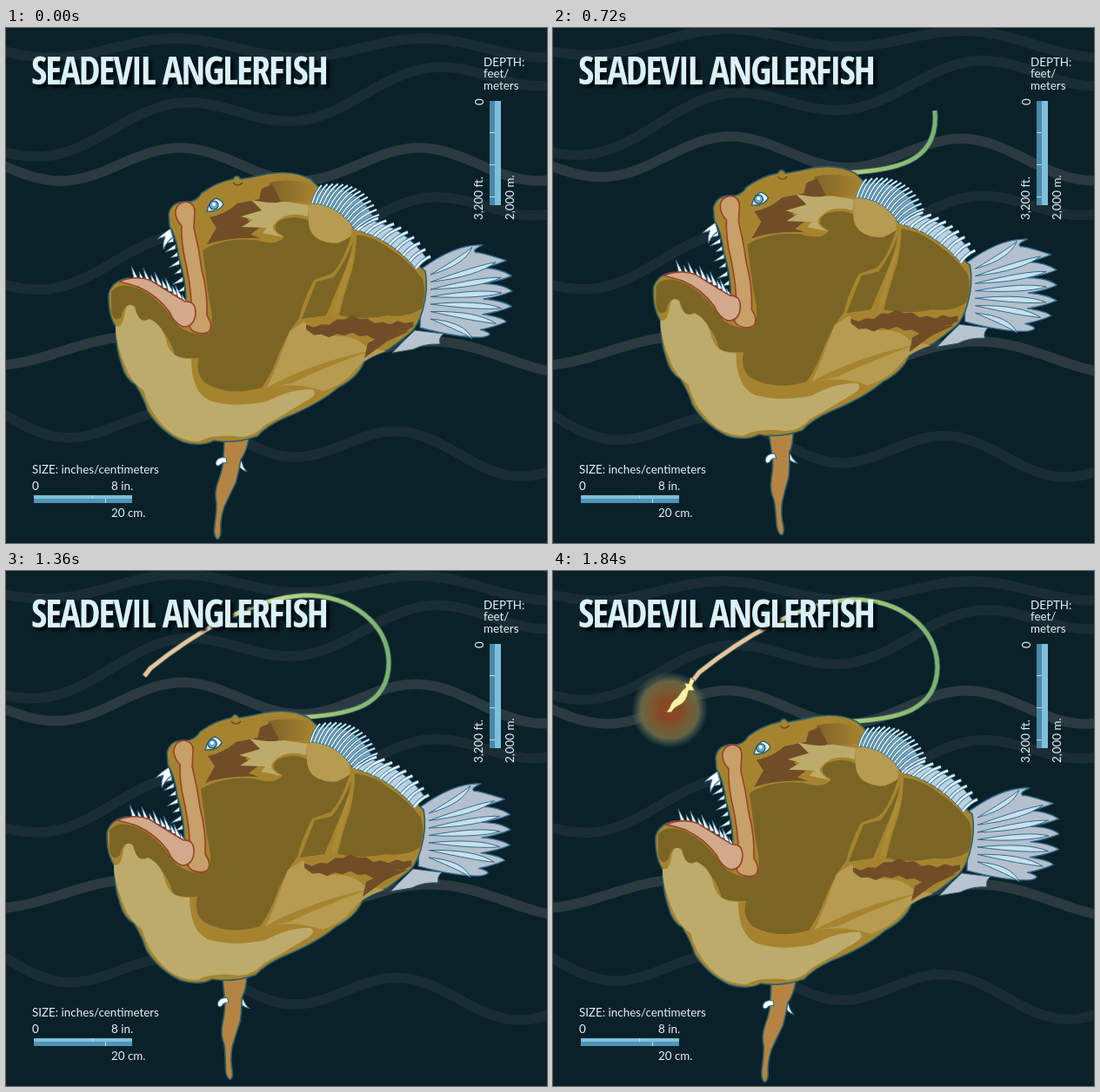
Animation of 622 by 593 pixels, one loop 1.92 s. Source, as an HTML page with a canvas:

```html
<!DOCTYPE html>
<html lang="en">
<head>
<meta charset="utf-8">
<title>Seadevil Anglerfish</title>
<style>
html, body { margin: 0; width: 100%; height: 100%; overflow: hidden; background: #0a2129; }
canvas, svg { position: absolute; left: 0; top: 0; width: 622px; height: 593px; display: block; }
text { font: 13.4px Lato, 'Open Sans', sans-serif; fill: #e4f1f6; }
#title { font-weight: 700; font-stretch: 62.5%; letter-spacing: -.045em; fill: #d9f1fd;
  filter: drop-shadow(4px 4px 1.5px #02080c); }
</style>
</head>
<body>
<canvas id="sea" width="622" height="593"></canvas>
<svg viewBox="0 0 622 593">
  <text id="title" x="29" y="68">SEADEVIL ANGLERFISH</text>
  <text x="549" y="44">DEPTH:</text>
  <text x="549" y="57">feet/</text>
  <text x="549" y="71">meters</text>
  <text transform="translate(549 89) rotate(-90)">0</text>
  <text transform="translate(548 221) rotate(-90)">3,200 ft.</text>
  <text transform="translate(584 221) rotate(-90)">2,000 m.</text>
  <text x="30" y="513">SIZE: inches/centimeters</text>
  <text x="30" y="532">0</text>
  <text x="121" y="532">8 in.</text>
  <text x="121" y="563">20 cm.</text>
</svg>
<script>
const LOOP = 1920, STEP = 80, TAU = 2 * Math.PI;
const ctx = document.getElementById('sea').getContext('2d');
const GOLD = '#a6842f', DARK = '#7b6525', TAN = '#bdab6b', OCHRE = '#b69b50', BROWN = '#704d27';
const EDGE = '#2b606a', BLUE = '#2f6d8f', LIP = '#9c4029', PALE = '#c9e0ed';

const clamp = v => Math.max(0, Math.min(1, v));
const range = n => [...Array(n).keys()];
const quad = ([a, b, c], t) => [0, 1].map(i =>
  (1 - t) * (1 - t) * a[i] + 2 * t * (1 - t) * b[i] + t * t * c[i]);

// Pick the narrowest installed face, then the largest size that fits the line.
function fitTitle() {
  const el = document.getElementById('title');
  const faces = ['Noto Sans ExtraCondensed', 'Open Sans Condensed', 'Roboto Condensed',
    'Noto Sans', 'Open Sans', 'Roboto', 'Liberation Sans'];
  const setFace = f => {
    el.style.fontFamily = `'${f}', sans-serif`;
    return el.getComputedTextLength();
  };
  el.style.fontSize = '52px';
  const best = faces.map(f => [setFace(f), f]).sort((a, b) => a[0] - b[0])[0];
  setFace(best[1]);
  const size = Math.min(52, 52 * 340 / best[0]);
  el.style.fontSize = size + 'px';
  el.setAttribute('y', 49.5 + .357 * size);
}

function shape(d, fill, stroke, width = 1.4) {
  const p = new Path2D(d);
  if (fill) { ctx.fillStyle = fill; ctx.fill(p); }
  if (stroke) { ctx.strokeStyle = stroke; ctx.lineWidth = width; ctx.stroke(p); }
}
const poly = pts => 'M' + pts.join('L');

// Each wave is a tilted cosine with crests at two given x; its middle rises by lift.
const waves = [
  { base: 23, amp: 11, tilt: 0, crests: [195, 480], lift: 15 },
  { base: 134, amp: 20, tilt: -.14, crests: [195, 485], lift: 15 },
  { base: 157, amp: 19, tilt: 0, crests: [200, 475], lift: 18, light: true },
  { base: 288, amp: 20, tilt: -.15, crests: [195, 480], lift: 3 },
  { base: 371, amp: 18, tilt: .016, crests: [150, 490], lift: 0, light: true },
  { base: 446, amp: 20, tilt: .085, crests: [195, 455], lift: -8 }
];

function drawWaves(k) {
  for (const { base, amp, tilt, crests: [a, b], lift, light } of waves) {
    const y = x => base + tilt * x - amp * Math.cos(TAU * (x - a) / (b - a))
      - k * lift * Math.sin(Math.PI * x / 622);
    const pts = range(109).map(i => 6 * i - 12).map(x => [x, y(x)]);
    shape(poly(pts), null, light ? '#2b3a40' : '#1b2d34', 11.5);
  }
}

function drawScales() {
  const bar = (c, x, y, w, h) => { ctx.fillStyle = c; ctx.fillRect(x, y, w, h); };
  bar('#4b88a8', 556, 84, 6, 120);
  bar('#7cc0da', 562, 84, 7, 120);
  for (const y of [120, 157, 194]) bar('#b9dcea', 556, y, 6, 1);
  bar('#7cc0da', 32, 538, 113, 4);
  bar('#4f94b4', 32, 542, 113, 5);
  bar('#b9dcea', 99, 538, 1, 4);
  bar('#b9dcea', 114, 542, 1, 5);
}

function drawFin(base, tip, count, web, width) {
  const rays = range(count).map(i => [base, tip].map(c => quad(c, i / (count - 1))));
  const rim = [...rays.map(r => r[0]), ...rays.map(r => quad([r[0], r[0], r[1]], .88)).reverse()];
  shape(poly(rim) + 'Z', web, BLUE, 1);
  for (const [[x, y], [u, v]] of rays) {
    const d = `M${x} ${y}Q${x + (u - x) * .4} ${y + (v - y) * .7} ${u} ${v}`;
    shape(d, null, BLUE, width + 1.5);
    shape(d, null, '#e6f3f9', width);
  }
}

function drawTail() {
  shape('M444 374Q457 360 470 348L503 352Q497 357 499 364Q482 363 468 370Z', '#b8c4d0', EDGE, 1);
  const tips = range(7).map(i => {
    const u = (i - 3) / 3;
    return { x: 582 - 34 * u ** 4, y: 303 + 53 * u, notch: 549 - 8 * u * u, lean: 5 * u };
  });
  let d = 'M478 277Q518 248 ';
  tips.forEach(({ x, y, notch, lean }, i) => {
    d += `${x} ${y}`;
    if (i < 6) d += `Q${x - 14} ${y + 6} ${notch} ${y + 9}Q${x - 10} ${y + 11 + lean} `;
  });
  shape(d + 'Q520 357 476 345Z', '#b4c0cd', BLUE, 1.3);
  tips.forEach(({ x, y }, i) => {
    const bx = 488, by = 284 + i * 8.5, mx = (bx + x) / 2 + 10, my = (by + y) / 2;
    shape(`M${bx} ${by}Q${mx} ${my - 7} ${x - 12} ${y + 2}Q${mx} ${my + 6} ${bx} ${by}Z`, PALE, BLUE, 1);
  });
}

// Brown streak with a toothed rim along the side.
function drawStreak() {
  const n = 15, rim = side => range(n).map(i => [
    345 + i * 8.8,
    345 + 3 * Math.sin(i * .8) + side * (2 + 8 * Math.sin(Math.PI * (i + .4) / n)) + (i % 2 ? 2 : -1)
  ]);
  shape(poly([...rim(-1), ...rim(1).reverse()]) + 'Z', BROWN);
  shape('M440 350L464 349L438 361L412 380L416 363Z', BROWN);
}

function drawBody() {
  shape('M187 214Q190 201 204 200Q218 202 225 190Q243 177 261 174Q265 167 270 174Q288 171 300 168' +
    'Q330 163 350 174L360 184Q388 188 400 231Q425 233 448 252Q468 268 482 280Q486 300 479 325' +
    'Q474 342 466 350Q454 360 440 370Q420 378 412 384Q405 402 382 414Q360 433 320 449' +
    'Q300 458 289 470Q264 479 239 475Q224 483 202 476Q177 464 163 441Q158 425 149 411' +
    'Q137 404 133 388Q125 365 127 345Q117 331 118 306Q122 291 140 288Q160 290 182 301L207 315' +
    'Q207 290 199 265Q196 240 188 228Z', GOLD, EDGE, 1.6);

  // flank and lower jaw
  shape('M121 304Q129 292 150 299Q175 309 198 343Q216 356 234 351Q240 338 233 310L226 256' +
    'Q250 241 287 244Q312 252 320 240Q303 232 314 222Q335 213 352 224Q358 248 382 248L397 240' +
    'Q385 275 374 283L354 290Q342 313 337 334Q321 354 310 385Q302 404 294 414' +
    'Q257 425 229 409Q217 397 222 380Q206 381 194 377Q189 355 171 340Q154 347 148 320' +
    'Q136 315 133 332Q124 341 121 326Z', DARK);
  shape('M403 238Q424 240 444 256Q464 269 479 289Q484 306 478 323Q462 334 439 331Q409 337 383 331' +
    'Q388 309 398 279Q403 257 403 238Z', DARK);
  shape('M357 292L377 287Q391 268 399 246Q396 266 386 288L368 331L340 335Z', DARK);
  shape('M400 263Q388 303 382 327L376 331Q382 302 395 265Z', '#ad8b36');

  // belly and side fin
  shape('M137 326Q140 314 148 322Q153 342 165 335Q181 342 185 363Q191 382 213 381Q213 419 234 429' +
    'Q262 438 300 430Q328 415 352 416Q360 421 346 429Q322 444 298 457Q282 474 263 470' +
    'Q237 468 222 476Q197 476 180 457Q164 440 158 417Q144 408 137 389Q125 359 126 343Q134 347 137 326Z', TAN);
  shape('M300 414Q311 392 326 349L343 338Q357 353 382 355Q401 354 414 367L437 372Q411 381 404 391' +
    'Q388 411 365 418Q333 407 300 414Z', OCHRE);
  shape('M300 414Q350 386 421 371Q372 388 328 409Z', GOLD);
  drawStreak();

  // head markings
  const shade = ctx.createLinearGradient(300, 0, 356, 0);
  shade.addColorStop(0, '#7d6028');
  shade.addColorStop(1, GOLD);
  shape('M303 178Q328 172 357 181L350 199Q325 203 303 198Z', shade);
  shape('M234 218Q253 214 266 202L291 197L294 185L306 180L316 199L277 221L291 230' +
    'L281 238L293 242Q258 240 231 249L242 230Z', BROWN);
  shape('M282 198Q305 203 322 200L348 204L347 217Q323 210 310 224Q301 232 319 241L295 236L300 230' +
    'L271 229L284 221L270 217L294 210Z', TAN);
  shape('M348 204Q371 197 386 211Q399 220 397 239Q380 253 361 244Q346 237 348 216Z', OCHRE);
  shape('M261 178Q266 184 272 178', null, '#574c22');

  // eye
  shape('M231 211Q234 198 242 196Q249 199 250 203Q245 212 231 211Z', '#d6edf7', EDGE);
  shape('M234 204a5 5 0 1 0 10 0a5 5 0 1 0 -10 0', '#68a9c9', '#1d4b61', 1.2);
  shape('M237 203a2 2 0 1 0 4 0a2 2 0 1 0 -4 0', '#fff');
}

// Slim teeth along a gum line, long and short by turns.
function drawTeeth(gum, count, dx, dy) {
  for (const i of range(count)) {
    const [x, y] = quad(gum, i / (count - 1)), s = i % 2 ? .65 : 1;
    const tip = [x + dx * s, y + dy * s], w = 2.6;
    const side = dx < dy ? [0, w] : [w, 0];
    const root = [[x - side[0], y - side[1]], [x + side[0], y + side[1]]];
    shape(poly([root[0], tip, root[1]]) + 'Z', '#fff', BLUE, .8);
  }
}

function drawMouth() {
  drawTeeth([[190, 236], [199, 262], [205, 300]], 8, -12, 6);
  shape('M189 231Q181 236 174 243L183 240Q180 247 181 255Q186 244 192 241Z', '#fff', BLUE, 1);
  drawTeeth([[150, 290], [182, 293], [206, 317]], 10, -6, -16);
  shape('M195 210Q197 201 207 200Q217 202 217 211L216 230Q222 254 225 278Q232 305 231 331' +
    'Q239 343 233 350Q224 354 215 349Q207 343 213 328Q214 306 207 272Q201 247 202 228Q194 220 195 210Z',
    '#c8a069', LIP, 1.6);
  shape('M130 292Q150 284 167 291Q184 302 206 315Q218 314 218 328Q217 344 204 344Q193 340 188 327' +
    'Q174 308 152 298Q139 294 130 292Z', '#d0aa8b', LIP, 1.6);
}

function drawMate(k) {
  ctx.save();
  ctx.translate(265, 474);
  ctx.rotate(-k * 13 * TAU / 360);
  ctx.translate(-265, -474);
  shape('M266 500Q268 508 277 511Q272 506 271 499Z', '#fff', BLUE, 1);
  shape('M251 472L279 473Q277 487 270 497Q267 514 264 524Q257 538 251 551Q246 566 247 580' +
    'Q246 590 242 588Q238 583 240 572Q242 558 242 547Q239 535 244 522Q250 506 250 494Z', '#b58443', EDGE, 1.6);
  shape('M253 495Q243 493 241 501Q242 506 246 503Q249 499 254 501Z', '#fff', BLUE, 1);
  ctx.restore();
}

const rod = 'M330 174C400 172 442 160 442 110C441 66 400 33 345 33C283 36 214 80 168 117L161 126';
const rodEl = document.createElementNS('http://www.w3.org/2000/svg', 'path');
rodEl.setAttribute('d', rod);
const rodLength = rodEl.getTotalLength();

function drawRod(t) {
  const grown = clamp((t - 430) / 930);
  if (!grown) return;
  const tint = ctx.createLinearGradient(440, 0, 165, 0);
  ['#7fb06d', '#a4c275', '#ced688', '#ecc397', '#f0c19c'].forEach((c, i) => tint.addColorStop(i / 4, c));
  ctx.save();
  ctx.setLineDash([rodLength * grown, 2000]);
  shape(rod, null, '#2f6a62', 6.4);
  shape(rod, null, tint, 4.6);
  ctx.restore();
}

function drawLure(t) {
  const glow = 44 * clamp((t - 1520) / 320);
  if (glow) {
    const g = ctx.createRadialGradient(134, 160, 0, 134, 160, glow);
    ['150,68,35,1', '138,72,40,.97', '127,92,50,.95', '112,108,70,.9', '80,105,98,0']
      .forEach((c, i) => g.addColorStop(i / 4, `rgba(${c})`));
    ctx.fillStyle = g;
    ctx.beginPath();
    ctx.arc(134, 160, glow, 0, TAU);
    ctx.fill();
  }
  const size = clamp((t - 1360) / 160);
  if (!size) return;
  ctx.save();
  ctx.translate(161, 124);
  ctx.scale(size, size);
  ctx.translate(-161, -124);
  shape('M158 123L163 126L160 132L163 138L156 138Q154 151 145 155Q139 157 136 163L130 163L134 158' +
    'Q136 150 143 146Q148 137 153 134L151 129L156 130Z', '#fbf2a5', '#76703a', 1);
  ctx.restore();
}

function draw(t) {
  const k = (1 - Math.cos(TAU * t / LOOP)) / 2;
  ctx.fillStyle = '#0a2129';
  ctx.fillRect(0, 0, 622, 593);
  drawWaves(k);
  drawScales();
  ctx.save();
  ctx.translate(-3 * k, -8 * k);
  drawRod(t);
  drawTail();
  drawMate(k);
  drawBody();
  drawFin([[404, 233], [444, 244], [471, 277]], [[428, 219], [466, 229], [488, 263]], 9, '#b9d2e4', 2.6);
  drawFin([[352, 202], [382, 203], [401, 232]], [[363, 181], [410, 172], [429, 215]], 15, '#7fa8c0', 1.6);
  drawMouth();
  drawLure(t);
  ctx.restore();
}

const start = performance.now();
function tick() {
  const t = Math.max(0, performance.now() - start) % LOOP;
  draw(Math.floor(t / STEP) * STEP);
  requestAnimationFrame(tick);
}
ctx.lineJoin = 'round';
fitTitle();
tick();
</script>
</body>
</html>
```
